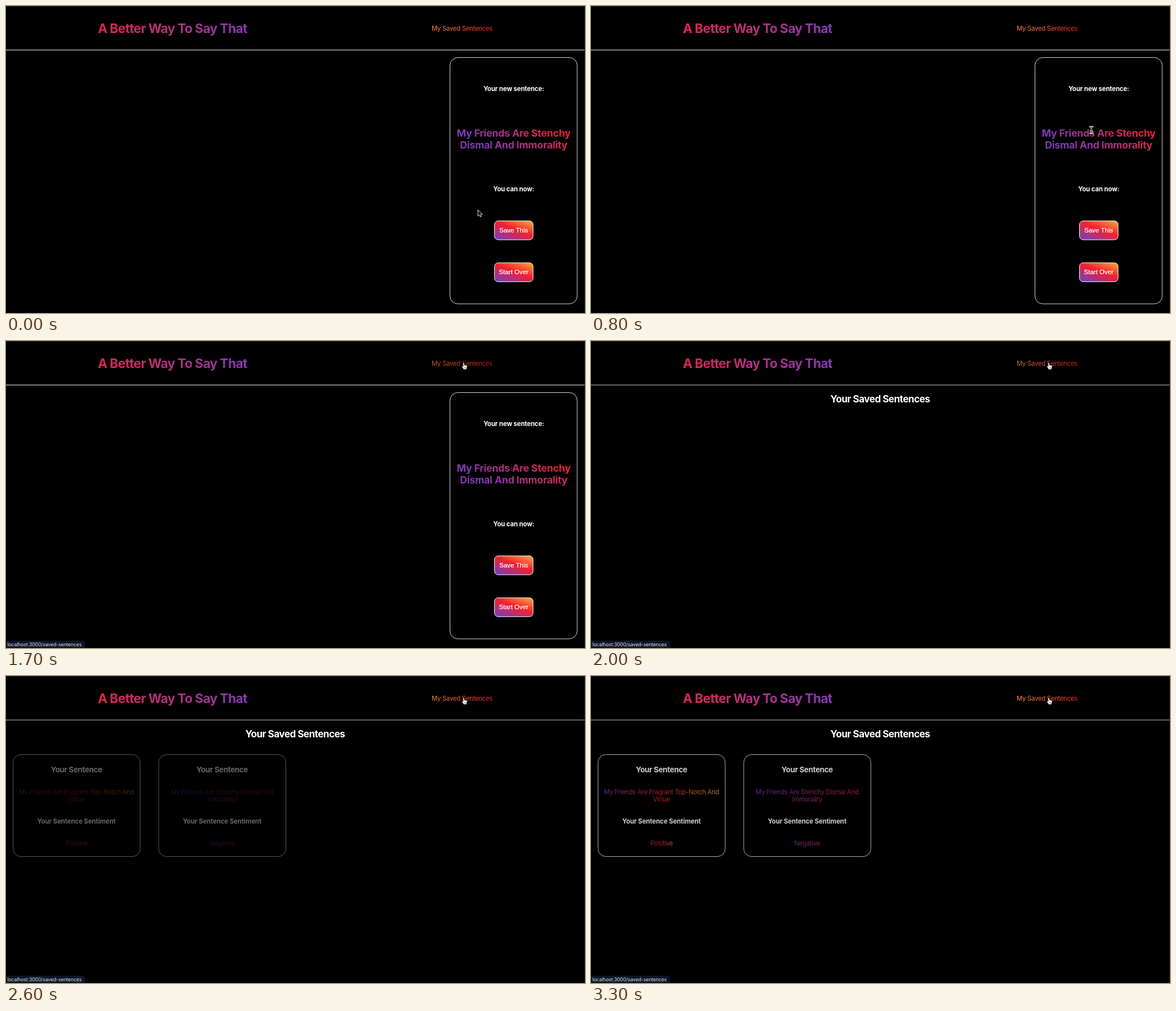
An HTML page for the animation above (3400 ms loop, 1027 by 545 pixels).

```html
<!DOCTYPE html>
<html lang="en">
<head>
<meta charset="utf-8">
<title>A Better Way To Say That</title>
<style>
  html, body { margin: 0; width: 100%; height: 100%; overflow: hidden; background: #000; }
  svg { display: block; width: 1027px; height: 545px; }
  text { font-family: Inter, sans-serif; font-size: 11.4px; fill: #fff; }
  .mid { text-anchor: middle; }
  .bold { font-weight: 700; letter-spacing: -.012em; }
  .body { letter-spacing: -.027em; }
  .title { font-size: 22.8px; font-weight: 700; letter-spacing: -.029em; }
  .page { font-size: 17.1px; font-weight: 700; letter-spacing: -.031em; }
  .result { font-size: 17.8px; font-weight: 700; letter-spacing: -.014em; }
  .head { font-size: 13.35px; font-weight: 700; letter-spacing: -.023em; }
  .label { font-family: "Liberation Sans", Arial, sans-serif; font-size: 11.5px; stroke: #fff; stroke-width: .25; }
  .url { font-size: 8.56px; letter-spacing: -.005em; }
  .box { fill: none; stroke: #fff; stroke-width: .85; }
</style>
</head>
<body>
<svg viewBox="0 0 1027 545">
  <defs id="defs"></defs>
  <rect width="1027" height="545"/>
  <rect width="1027" height="1" fill="#12293b"/>
  <rect x="1026" y="1" width="1" height="544" fill="#1d2224"/>

  <text class="title" x="163" y="48" style="fill:url(#gTitle)">A Better Way To Say That</text>
  <text class="body" id="link" x="755" y="44" style="fill:url(#gLink)">My Saved Sentences</text>
  <rect id="rule" y="77.6" width="1026" height="1" fill="#fff"/>

  <g id="panel">
    <rect class="box" x="787.5" y="91.5" width="225.6" height="437.3" rx="14"/>
    <text class="bold mid" x="900.7" y="150.6">Your new sentence:</text>
    <g style="--c:url(#gResult)">
      <text class="result mid" x="900.5" y="232" style="fill:var(--c)">My Friends Are Stenchy</text>
      <text class="result mid" x="900.5" y="253.4" style="fill:var(--c)">Dismal And Immorality</text>
    </g>
    <text class="bold mid" x="900.7" y="329">You can now:</text>
    <g id="buttons"></g>
  </g>

  <g id="saved">
    <text class="page mid" x="512.8" y="109.2">Your Saved Sentences</text>
    <g id="cards"></g>
  </g>

  <g id="status">
    <path d="M0 532H137q3 0 3 3V545H0Z" fill="#0d1626"/>
    <text class="url" x="2.4" y="542" style="fill:#e8eaed">localhost:3000/saved-sentences</text>
  </g>

  <g id="arrow">
    <path d="M0 0V11L2.6 8.7L4.3 12.5L6.2 11.6L4.5 8H8Z" fill="#000" stroke="#fff" stroke-width=".9" stroke-linejoin="round"/>
  </g>
  <g id="beam" fill="none" stroke-linecap="round">
    <path d="M-2.6 -6Q0 -6 0 -4V4Q0 6 -2.6 6M2.6 -6Q0 -6 0 -4V4Q0 6 2.6 6M-1.5 2H1.5" stroke="#fff" stroke-width="2.4"/>
    <path d="M-2.6 -6Q0 -6 0 -4V4Q0 6 -2.6 6M2.6 -6Q0 -6 0 -4V4Q0 6 2.6 6M-1.5 2H1.5" stroke="#111" stroke-width=".8"/>
  </g>
  <g id="hand">
    <path d="M-1.6 .3Q-1.4 -1 -.3 -.9Q.6 -.8 .7 .4L1.1 3.4Q2.2 2.8 2.9 3.7Q4 3.1 4.6 4.2Q5.9 3.8 6 5.4Q6.1 7.6 5 9.4V11H-.3Q-1 9.2 -2.7 7.2Q-4 5.6 -2.9 5Q-2 4.6 -.9 5.9Z" fill="#fff" stroke="#000" stroke-width=".6"/>
    <path d="M1.3 7.2V9.2M2.7 7.2V9.2M4 7.2V9.2" stroke="#000" stroke-width=".5"/>
  </g>
</svg>
<script>
const $ = id => document.getElementById(id);
const PURPLE = '#833ab4', RED = '#f5202a', GOLD = '#fcb045';

function gradient(id, [x1, y1, x2, y2], ...stops) {
  const marks = stops.map((c, i) =>
    `<stop offset="${i / (stops.length - 1)}" stop-color="${c}"/>`).join('');
  $('defs').innerHTML += `<linearGradient id="${id}" gradientUnits="userSpaceOnUse"
    x1="${x1}" y1="${y1}" x2="${x2}" y2="${y2}">${marks}</linearGradient>`;
}
gradient('gTitle', [163, 40, 428, 40], '#dc2749', PURPLE);
gradient('gLink', [750, 40, 863, 40], '#fb8a3a', '#f5222a');
gradient('gResult', [810, 226, 866.7, 137], '#7d3ab8', RED);
gradient('gButton', [26.9, 37.9, 44, -9.1], PURPLE, RED, GOLD);
gradient('gGood', [10, 75, 222, 55], PURPLE, RED, GOLD);
gradient('gGoodMood', [82, 162, 144, 150], '#b02f76', RED, GOLD);
gradient('gBad', [24, 72, 222, 52], '#6f3ac0', '#f0202f');
gradient('gBadMood', [88, 158, 146, 150], PURPLE, '#e8243c');

const button = (y, label) => `<g transform="translate(866 ${y})">
  <rect x=".5" y=".5" width="68.4" height="33.5" rx="6.5" fill="url(#gButton)" stroke="#fff"/>
  <text class="label mid" x="34.5" y="20.8">${label}</text></g>`;
$('buttons').innerHTML = button(381, 'Save This') + button(455.4, 'Start Over');

const tinted = (y, fill, s) =>
  `<text class="body mid tint" x="113" y="${y}" style="fill:url(#${fill})">${s}</text>`;
const card = (x, tone, lines, mood) => `<g transform="translate(${x} 139)">
  <rect class="box" x=".5" y=".5" width="225.5" height="181" rx="14"/>
  <text class="head mid" x="113" y="32.3">Your Sentence</text>
  ${lines.map((s, i) => tinted(70.8 + 13 * i, tone, s)).join('')}
  <text class="bold mid" x="113" y="123" style="letter-spacing:-.007em">Your Sentence Sentiment</text>
  ${tinted(162, tone + 'Mood', mood)}</g>`;
$('cards').innerHTML =
  card(12, 'gGood', ['My Friends Are Fragrant Top-Notch And', 'Virtue'], 'Positive') +
  card(270.4, 'gBad', ['My Friends Are Stenchy Dismal And', 'Immorality'], 'Negative');
const tints = document.querySelectorAll('.tint');

// Rows: time, then values blended linearly up to the next row.
const PATH = [[0, 837, 362], [100, 880, 412], [200, 906, 450], [300, 908, 470],
  [400, 907, 472], [500, 904, 448], [600, 901, 404], [700, 896, 320],
  [800, 887.5, 220.3], [900, 868, 134], [1000, 848, 80], [1100, 848, 80],
  [1200, 822, 50], [1300, 812, 39.5]];
const LINK = [[1200, 1], [1500, .76], [1700, .73], [2000, .82], [2600, .95], [3300, 1]];
const CARDS = [[2300, 0], [2400, .14], [2600, .4], [2900, .6], [3300, .81]];

function at(rows, t) {
  const i = rows.findIndex(r => r[0] > t);
  if (i < 0) return rows[rows.length - 1].slice(1);
  if (i === 0) return rows[0].slice(1);
  const a = rows[i - 1], b = rows[i], k = (t - a[0]) / (b[0] - a[0]);
  return a.slice(1).map((v, j) => v + (b[j + 1] - v) * k);
}
const show = (id, on) => { $(id).style.display = on ? '' : 'none'; };

function pointer(x, y) {
  const onButton = x > 866 && x < 935 && (y > 455 && y < 490 || y > 381 && y < 415);
  const onText = x > 800 && x < 1001 && y > 214 && y < 260;
  const kind = onButton || y < 46 ? 'hand' : onText ? 'beam' : 'arrow';
  for (const id of ['arrow', 'beam', 'hand']) show(id, id === kind);
  $(kind).setAttribute('transform', `translate(${x} ${y})`);
}

function draw() {
  const t = Math.floor(performance.now() % 3400 / 100) * 100;
  const saved = t >= 1800, [fade] = at(CARDS, t);
  pointer(...at(PATH, t));
  show('panel', !saved);
  show('saved', saved);
  show('status', t >= 1300);
  $('rule').style.opacity = saved ? .8 : 1;
  $('link').style.opacity = at(LINK, t)[0];
  $('cards').style.opacity = fade;
  tints.forEach(el => { el.style.opacity = fade ** .55; });
  requestAnimationFrame(draw);
}
draw();
</script>
</body>
</html>
```
